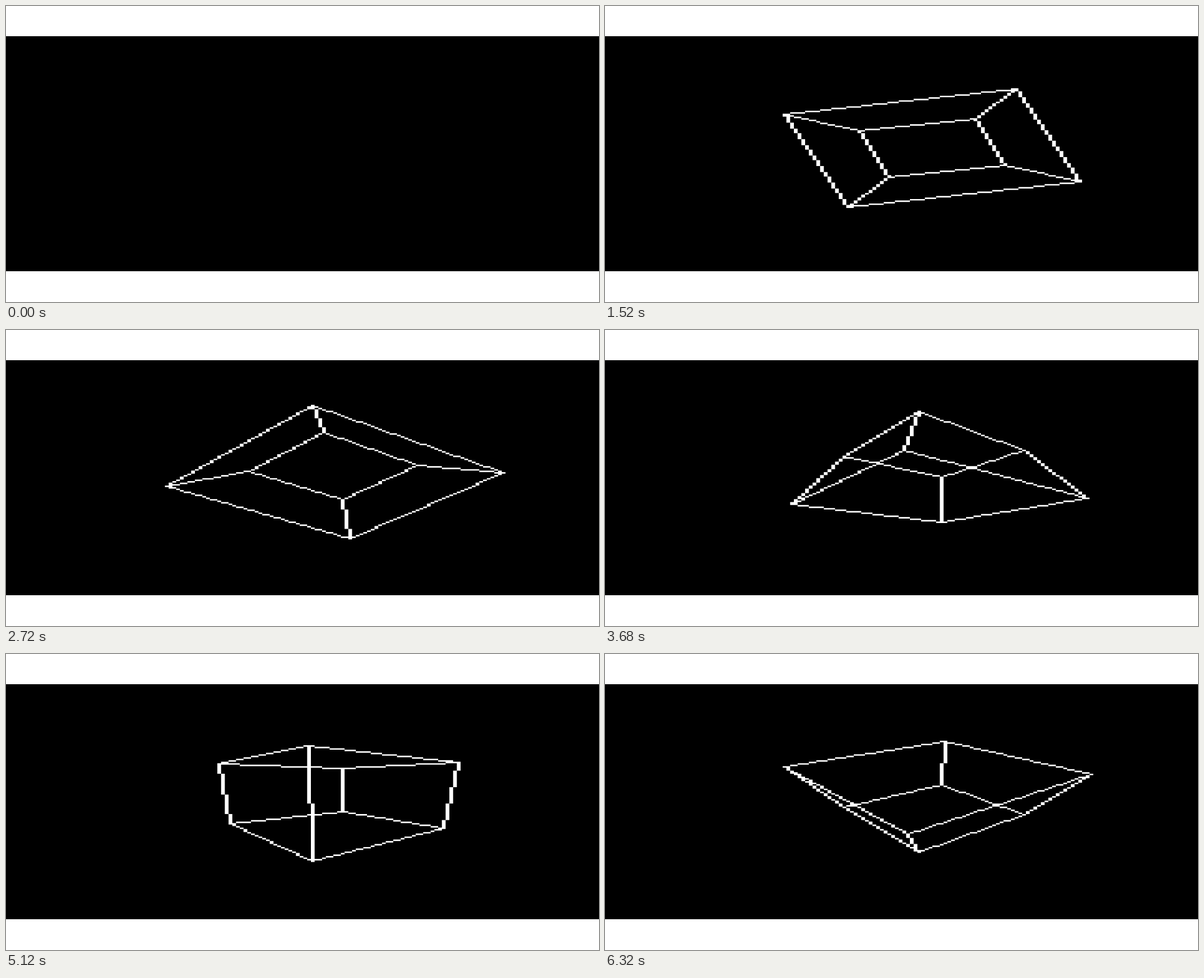
Write an HTML page with a canvas that moves like this. It is 1058 by 529 pixels and loops after 6360 ms.

```html
<!DOCTYPE html>
<html lang="en">
<head>
<meta charset="utf-8">
<title>Wireframe cube</title>
<style>
  html, body { margin: 0; width: 100%; height: 100%; overflow: hidden; background: #fff; }
  canvas { display: block; }
</style>
</head>
<body>
<canvas id="stage" width="1058" height="529"></canvas>
<script>
const ctx = document.getElementById('stage').getContext('2d');

const LOOP = 6360, STEP = 80;
const TEXT_AT = 40, DOT_AT = 1080, CUBE_AT = 1120;
const TURN = Math.PI / 60;   // 3 degrees per step
const SPIN_STEPS = 17;       // z turns before the x turns begin

// Coarse 128 x 96 display with wide, flat pixels
const PX = { x: 156.72, y: 125.65, w: 6.677, h: 2.674 };

// 3 x 5 glyphs, one octal digit per row
const GLYPHS = {
  A: '75755', B: '65656', C: '74447', D: '65556', E: '74647',
  G: '74557', H: '55755', I: '72227', N: '65555', O: '75557',
  R: '65655', T: '72222', U: '55557', '.': '00004'
};
const MESSAGE = 'RENDERING THE ROTATING CUBE.';

// Corner bits: 1 = x, 2 = y, 4 = z
const CORNERS = Array.from({ length: 8 }, (_, i) =>
  [1, 2, 4].map(bit => (i & bit ? 1 : -1)));
const EDGES = [];
for (let i = 0; i < 8; i++)
  for (const bit of [1, 2, 4])
    if (!(i & bit)) EDGES.push([i, i | bit]);

function plot(col, row) {
  ctx.rect(PX.x + col * PX.w, PX.y + row * PX.h, PX.w, PX.h);
}

function line([x, y], [x1, y1]) {
  const dx = Math.abs(x1 - x), dy = -Math.abs(y1 - y);
  const sx = Math.sign(x1 - x), sy = Math.sign(y1 - y);
  let err = dx + dy;
  for (;;) {
    plot(x, y);
    if (x === x1 && y === y1) return;
    const e2 = 2 * err;
    if (e2 >= dy) { err += dy; x += sx; }
    if (e2 <= dx) { err += dx; y += sy; }
  }
}

function write(text) {
  [...text].forEach((ch, i) => {
    [...(GLYPHS[ch] || '')].forEach((bits, row) => {
      for (let c = 0; c < 3; c++)
        if (bits & (4 >> c)) plot(4 + i * 4 + c, row);
    });
  });
}

function project([x, y, z], spin, tilt) {
  const u = x * Math.cos(spin) + y * Math.sin(spin);
  const v = y * Math.cos(spin) - x * Math.sin(spin);
  const down = v * Math.cos(tilt) - z * Math.sin(tilt);
  const scale = 64 / (3 + v * Math.sin(tilt) + z * Math.cos(tilt));
  return [Math.floor(64 + u * scale), Math.floor(48 + down * scale)];
}

function cube(step) {
  const spin = TURN * Math.min(step, SPIN_STEPS);
  const tilt = TURN * Math.max(step - SPIN_STEPS, 0);
  const points = CORNERS.map(p => project(p, spin, tilt));
  for (const [a, b] of EDGES) line(points[a], points[b]);
}

function draw(t) {
  ctx.fillStyle = '#fff';
  ctx.fillRect(0, 0, 1058, 529);
  ctx.fillStyle = '#000';
  ctx.fillRect(0, 54, 1058, 420);
  ctx.fillStyle = '#fff';
  ctx.beginPath();
  if (t >= CUBE_AT) cube(Math.floor((t - CUBE_AT) / STEP));
  else if (t >= TEXT_AT) write(t < DOT_AT ? MESSAGE : MESSAGE + '.');
  ctx.fill();
}

const start = performance.now();
function tick() {
  draw((performance.now() - start) % LOOP);
  requestAnimationFrame(tick);
}
tick();
</script>
</body>
</html>
```
